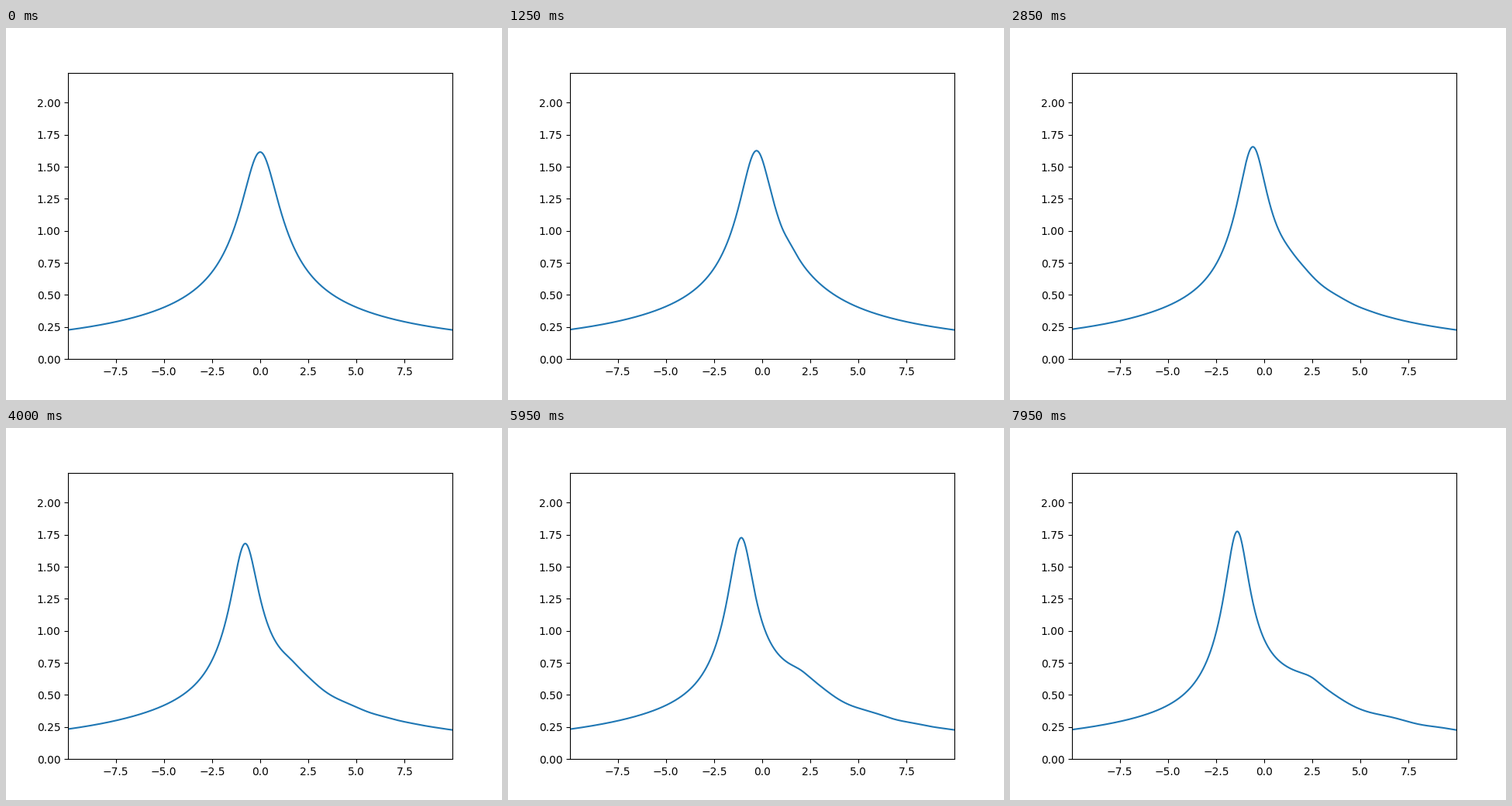
These frames come from a looping animation (640x480 px, 8000 ms). A matplotlib script:

```python
import numpy as np
import matplotlib.pyplot as plt
from matplotlib.animation import FuncAnimation

FRAMES, STEP = 160, 50
X_MAX, Y_MAX = 9.98, 2.2337
REST_TOP = 1.6145


def settle(t, tau, power=1):
    """Rise from 0 towards 1 with time constant tau."""
    return 1 - np.exp(-(t / tau)**power)


def rest(x):
    """Symmetric wave at time zero."""
    s = x**2
    return np.sqrt(5.9 * (s + 14.65) / (s**2 + 31.14 * s + 33.2))


def core(x, t):
    """Peak that drifts left, grows and sharpens."""
    peak = -t * (0.17 + 0.1 * np.exp(-t / 2.8))
    top = REST_TOP + 0.0262 * t**2 / (t + 2.34)
    base = 0.1695 + 0.0014 * t
    gain = 0.165 + 0.3 * settle(t, 4, 1.3)
    reach = 14.65 - 5 * np.sin(np.pi * t / 8)
    narrow = 0.185 + 0.3 * settle(t, 1.3)

    d2 = (x - peak)**2
    left = base + gain / (1 + d2 / reach)
    right = (base + gain) / (1 + d2 * narrow**2)
    return (top**-2 + d2 * np.where(x < peak, left, right))**-0.5


def tail(x, t):
    """Right flank with ripples that spread like the square root of time."""
    x = np.maximum(x, 0)
    t = t + 1e-6
    xi = x / np.sqrt(t)
    ripple = -0.15 * np.exp(-2.6 * x / t) * np.cos(1.25 * xi**2 - 4.3)
    dip = 0.17 / (1 + (xi / 1.1)**6) + 0.05 / (1 + (x / 2.6)**6)
    return rest(x) * (1 + settle(t, 0.6) * (ripple - dip))


def profile(x, t):
    mix = 1 / (1 + np.exp((0.85 + 0.22 * t - x) / 0.25))
    return core(x, t) * (1 - mix) + tail(x, t) * mix


x = np.linspace(-X_MAX, X_MAX, 999)
fig, ax = plt.subplots(figsize=(6.4, 4.8), dpi=100)
ax.set_xlim(-X_MAX, X_MAX)
ax.set_ylim(0, Y_MAX)
line, = ax.plot(x, profile(x, 0))


def update(frame):
    line.set_ydata(profile(x, frame * STEP / 1000))
    return line,


anim = FuncAnimation(fig, update, frames=FRAMES, interval=STEP,
                     repeat=True, repeat_delay=0)
plt.show()
```
